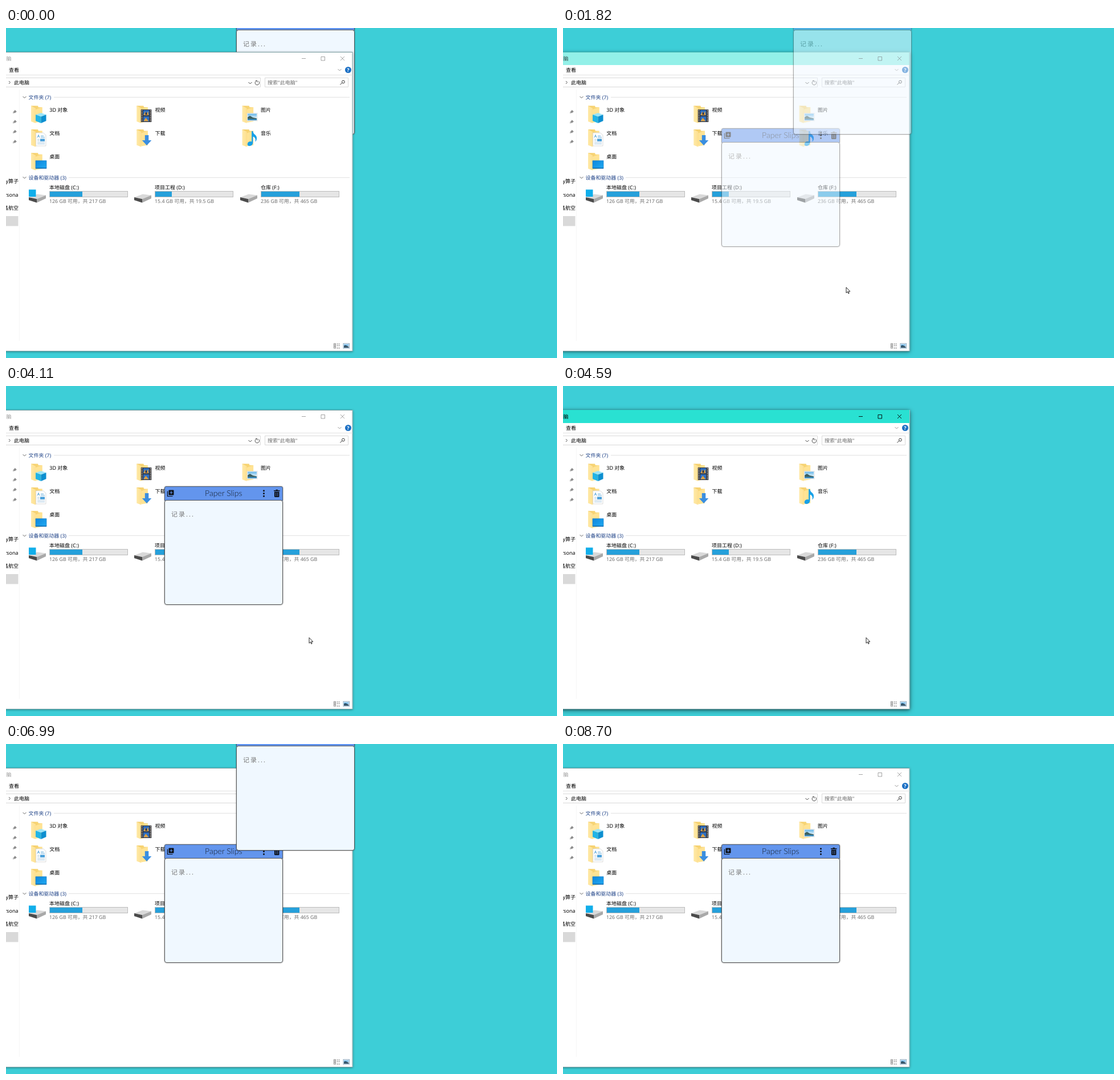
An HTML page that plays this animation: 967x579 px, repeating every 9.16 s.

```html
<!DOCTYPE html>
<html lang="zh">
<head>
<meta charset="utf-8">
<title>桌面便签</title>
<style>
  html, body { margin: 0; width: 100%; height: 100%; overflow: hidden; background: #3dced7; }
  svg { display: block; width: 100%; height: 100%; }
  text { font: 9px "Noto Sans", "Noto Sans CJK SC", "Noto Sans CJK", sans-serif; text-rendering: geometricPrecision; white-space: pre; }
  .sub { fill: #6d6d6d; font-size: 8.85px; }
  .head { fill: #1e4287; font-size: 8.95px; }
  .line { fill: none; stroke: #e2e2e2; }
  .title { font: 300 14px Lato, sans-serif; fill: #16202e; text-anchor: middle; }
  .hint { font-size: 11px; letter-spacing: 2px; fill: #757575; }
</style>
</head>
<body>
<svg viewBox="0 0 967 579" preserveAspectRatio="none">
  <defs>
    <filter id="soft" x="-10%" y="-10%" width="120%" height="120%">
      <feDropShadow dx="0" dy="1" stdDeviation="2" flood-opacity=".4"/>
    </filter>
    <filter id="deep" x="-10%" y="-10%" width="120%" height="120%">
      <feDropShadow dx="0" dy="2" stdDeviation="5" flood-opacity=".45"/>
    </filter>
    <filter id="noteShade" x="-5%" y="-5%" width="110%" height="110%">
      <feDropShadow dx="0" dy="0" stdDeviation="1" flood-opacity=".45"/>
    </filter>
    <linearGradient id="back"><stop stop-color="#f3cb63"/><stop offset="1" stop-color="#fbdc84"/></linearGradient>
    <linearGradient id="flap"><stop stop-color="#ffe9a6"/><stop offset="1" stop-color="#fde092"/></linearGradient>
    <linearGradient id="sky" x2="0" y2="1"><stop stop-color="#5fb2e8"/><stop offset=".6" stop-color="#d7edf8"/></linearGradient>
    <linearGradient id="screen" x2="1" y2="1"><stop stop-color="#0f86dc"/><stop offset="1" stop-color="#20aaf2"/></linearGradient>

    <g id="folder">
      <path d="M1 1.5H13L14 4H20.500V29H6z" fill="url(#back)"/>
      <path d="M1 1.500L9 5.500V32L1 29z" fill="url(#flap)"/>
      <path d="M9 8L20.500 4V29L9 31z" fill="#ffe394"/>
    </g>
    <g id="drive">
      <path d="M0 6L15 0.500 30 2.500 14 9z" fill="#d9d9d9"/>
      <path d="M0 6L14 9V15.500L0 11z" fill="#4b4b4b"/>
      <path d="M14 9L30 2.500V8L14 15.500z" fill="#a9a9a9"/>
    </g>
    <g id="pin" fill="#8b8b8b" stroke="#8b8b8b">
      <path d="M0-3.500L3.500 0 2 .5 0 2.500-2.500 0-.5-2z" stroke="none"/>
      <path d="M-3.500 1.500L0-1.500M-3 3L-1 1" fill="none"/>
    </g>
    <path id="chev" d="M-3-1.500L0 1.500 3-1.500" fill="none"/>

    <g id="note">
      <g filter="url(#noteShade)">
        <path d="M278.500 201V179Q278.500 176.500 281 176.500H483Q485.500 176.500 485.500 179V201z" fill="#6495ed" stroke="#4c5a70"/>
        <rect x="278.500" y="200.500" width="207" height="183" rx="3.500" fill="#f0f8ff" stroke="#555"/>
      </g>
      <text class="title" x="381.700" y="193">Paper Slips</text>
      <text class="hint" x="290" y="229">记录...</text>
      <g fill="#0d1117">
        <rect x="285.500" y="182.500" width="9" height="9" rx="1"/>
        <path d="M283.500 184.500V193.500H292.500" fill="none" stroke="#0d1117" stroke-width="1.200"/>
        <path d="M290 184.500V189.500M287.500 187H292.500" stroke="#6495ed" stroke-width="1.200"/>
        <circle cx="452.500" cy="183.700" r="1.500"/><circle cx="452.500" cy="188.500" r="1.500"/><circle cx="452.500" cy="193.200" r="1.500"/>
        <path d="M470 183h3l1-1.200h2.500l1 1.200h3v1.500h-10.500z"/>
        <path d="M471 185.500h8.500v8q0 1.500-1.500 1.500h-5.500q-1.500 0-1.500-1.500z"/>
        <path d="M473.700 187v6.500M476.800 187v6.500" stroke="#6495ed" stroke-width=".8"/>
      </g>
    </g>
  </defs>

  <rect width="967" height="579" fill="#3dced7"/>
  <use id="behind" href="#note" x="126" y="-197"/>

  <g id="explorer">
    <rect x="-20" y="42" width="628.500" height="525" fill="#fff" filter="url(#soft)"/>
    <rect id="glow" x="-20" y="42" width="628.500" height="525" fill="#fff" filter="url(#deep)"/>
    <rect x="-20" y="42.500" width="628" height="524.500" fill="#fff" stroke="#4f7f84" stroke-opacity=".75"/>
    <rect id="bar" x="-20" y="42" width="628" height="23" fill="#29e1d2"/>
    <g id="caption">
      <text x="9.500" y="57" text-anchor="end">此电脑</text>
      <path d="M519 53.500H526M553 50.500H559.500V57H553zM587 50L594 57M594 50L587 57" fill="none" stroke="#000" stroke-width=".9"/>
    </g>

    <text x="5" y="77">查看</text>
    <use href="#chev" x="585.500" y="73.500" stroke="#999"/>
    <circle cx="600.500" cy="73.500" r="5.500" fill="#1a6fc4"/>
    <text x="600.500" y="76.800" text-anchor="middle" style="fill:#fff;font-weight:700">?</text>
    <path class="line" d="M0 82.500H608"/>
    <path class="line" d="M-5 87.500H446.500V103.500H-5zM454.500 87.500H600.500V103.500H454.500z" style="stroke:#d9d9d9"/>
    <path d="M5 93L7.500 95.500 5 98" fill="none" stroke="#555"/>
    <text x="14" y="98.700">此电脑</text>
    <use href="#chev" x="428.500" y="96.500" stroke="#444"/>
    <path d="M438.700 93.200A3.700 3.700 0 1 0 443 93.200M438 92.500h2.800v2.800" fill="none" stroke="#444"/>
    <text x="459" y="99" fill="#6d6d6d">搜索"此电脑"</text>
    <path d="M589.800 96.200L586.500 99.500M589.500 94.500a2.400 2.400 0 1 0 4.800 0a2.400 2.400 0 1 0-4.800 0" fill="none" stroke="#333"/>

    <path class="line" d="M23.500 108V549" style="stroke:#f6f6f6"/>
    <g id="side" text-anchor="end">
      <rect y="330" width="21.500" height="17.500" fill="#d9d9d9"/>
      <text x="22" y="272">ny算子</text>
      <text x="21.500" y="296">rsona</text>
      <text x="22" y="319">昌航空</text>
    </g>

    <use href="#chev" x="32.500" y="121.500" stroke="#666"/>
    <text class="head" x="39.500" y="124.500">文件夹 (7)</text>
    <path class="line" d="M84 121.500H603"/>
    <use href="#chev" x="32.500" y="262.500" stroke="#666"/>
    <text class="head" x="39.500" y="265.500">设备和驱动器 (3)</text>
    <path class="line" d="M110 262.500H603"/>
    <g id="items"></g>

    <g fill="none" stroke="#777">
      <path d="M575.500 553.500h3v2.500h-3zM575.500 559.500h3v2.500h-3zM575.500 556.500h3v2.500h-3z" stroke-width=".8"/>
      <path d="M580.500 554.500h5.500M580.500 557.500h5.500M580.500 561.500h5.500" stroke-dasharray="2.500 .7"/>
      <rect x="592" y="553.500" width="10.500" height="8.500" fill="#fff" stroke="#8aa9c2"/>
      <path d="M593 555h8.500v2.500h-8.500z" fill="#6db5e6" stroke="none"/>
      <path d="M593 557.500l3-1 5.500 2.500v2h-8.500z" fill="#35566b" stroke="none"/>
    </g>
  </g>

  <use id="lower" href="#note"/>
  <use id="upper" href="#note" x="126" y="-197"/>

  <g id="cursor" stroke="#111">
    <path id="arrow" d="M0 0V9.800L2.300 7.700 3.800 11 5.200 10.400 3.800 7.200H6.800z" fill="#fff" stroke-width=".9"/>
    <path id="resize" d="M0-6.500L3.200-3H1V3H3.200L0 6.500-3.200 3H-1V-3H-3.200z" fill="#fff" stroke-width=".9"/>
  </g>
</svg>
<script>
const $ = id => document.getElementById(id);
const LOOP = 9160;

// Overlay drawings, in the coordinates of their folder
const badges = {
  cube: `<path d="M18.500 14L27.500 17 18.500 20.500 9 17z" fill="#9be4f8"/>
    <path d="M9 17L18.500 20.500V32L9 28z" fill="#22b4e6"/><path d="M18.500 20.500L27.500 17V28L18.500 32z" fill="#0c8fd0"/>`,
  film: `<rect x="8.500" y="8" width="18.500" height="22" fill="#2c2c30"/>
    <path d="M10.300 9V30M25.200 9V30" stroke="#e8e8e8" stroke-width="1.500" stroke-dasharray="1.500 1.500"/>
    <path d="M12.500 9h10.500v9.500h-10.500zM12.500 20h10.500v9h-10.500z" fill="#2f6fc0"/>
    <path d="M13 18l3-6 3 3 2-4 1 7zM13 28.500l4-6 5 6z" fill="#e3a13c"/><path d="M17 12l3 5h-4z" fill="#182a50"/>`,
  photo: `<rect x="9.500" y="14.500" width="18" height="13.500" fill="#fff" stroke="#d5d5d5" stroke-width=".7"/>
    <rect x="10.500" y="15.500" width="16" height="11.500" fill="url(#sky)"/>
    <path d="M10.500 21.500l4-2.500 5 3 7 1.500v1.500h-16z" fill="#3c5f5e"/><path d="M10.500 24.500h16v2.500h-16z" fill="#3f8fc0"/>`,
  paper: `<path d="M9.500 7.500H22.500L27 11.500V30.500H9.500z" fill="#fdfdfd" stroke="#cfcfcf" stroke-width=".7"/>
    <path d="M12 16l2-5 2 5M12.800 14h2.500M18 13h5M18 15.500h7" fill="none" stroke="#5aa7dc" stroke-width=".9"/>
    <path d="M17 18h8v4.500h-8z" fill="#4aa0da"/><path d="M12 19h4M12 21.500h4M12 24.500h13M12 27h13" stroke="#a9cbe2" stroke-width=".9"/>`,
  down: `<path d="M15.500 11.500h6.500v9h5L18.700 29.500 10.500 20.500h5z" fill="#3a8ee0"/>`,
  music: `<path d="M17.500 4.500h2.300q.5 4 4 6.500 3.500 3 2.500 8-.7 3-2.500 4 1.300-5-1.300-7.500-1.500-1.500-2.700-1.500v10.500q0 5-5.500 6.200-4 .3-4.200-3 .2-4.500 5-5 1.500-.2 2.400.5z" fill="#17a1e8"/>`,
  desk: `<rect x="9" y="15" width="19" height="13.500" fill="url(#screen)" stroke="#0b74c4" stroke-width=".6"/>
    <path d="M9 27.500h19v1h-19z" fill="#0a5fa5"/>`
};
const folders = [["3D 对象", "cube"], ["视频", "film"], ["图片", "photo"], ["文档", "paper"],
  ["下载", "down"], ["音乐", "music"], ["桌面", "desk"]];
const drives = [["本地磁盘 (C:)", "126 GB 可用，共 217 GB", 57], ["项目工程 (D:)", "15.4 GB 可用，共 19.5 GB", 29],
  ["仓库 (F:)", "236 GB 可用，共 465 GB", 67]];
const colX = i => 185.3 * i;

function folderMarkup([name, badge], i) {
  const x = colX(i % 3), y = 135 + 41.4 * Math.floor(i / 3);
  return `<g transform="translate(${43 + x} ${y})"><use href="#folder"/>${badges[badge]}
    <text x="33.300" y="11.700">${name}</text></g>`;
}

function driveMarkup([name, size, used], i) {
  return `<g transform="translate(${Math.round(colX(i))} 0)"><use href="#drive" x="40" y="291"/>
    ${i ? "" : '<rect x="40" y="283.500" width="12.500" height="12.500" fill="#11aeea"/>'}
    <text x="76" y="283">${name}</text><text class="sub" x="76" y="306.700">${size}</text>
    <rect x="76.500" y="286.500" width="137" height="10" fill="#e6e6e6" stroke="#bcbcbc"/>
    <rect x="77" y="287" width="${used}" height="9" fill="#26a0da"/></g>`;
}

$("items").innerHTML = folders.map(folderMarkup).join("") + drives.map(driveMarkup).join("");
$("side").insertAdjacentHTML("beforeend",
  [147, 164.5, 182, 199.5].map(y => `<use href="#pin" x="15.500" y="${y}"/>`).join(""));

// Progress in n equal jumps, the first at a and the last at b
function jumps(t, a, b, n) {
  if (t < a) return 0;
  if (t >= b) return 1;
  return (1 + Math.floor((t - a) / (b - a) * (n - 1))) / n;
}

// Pointer moves: begin, end, jumps, x, y
const moves = [
  [110, 480, 6, 497, 455], [2270, 2500, 4, 504, 451], [2650, 2730, 2, 504, 447.5],
  [2880, 3050, 4, 538, 448], [3120, 3190, 2, 532, 448.5], [3330, 3500, 3, 532, 441.5],
  [5440, 5590, 3, 476, 171], [5820, 6210, 6, 427.5, 47], [6310, 6390, 2, 430, 3],
  [6460, 6680, 4, 847, 569], [6760, 6990, 4, 912, 580]
];

function pointer(t) {
  let x = 945, y = 595;
  for (const [a, b, n, tx, ty] of moves) {
    const k = jumps(t, a, b, n);
    x += (tx - x) * k;
    y += (ty - y) * k;
  }
  return [x, y];
}

const fade = (id, v) => $(id).setAttribute("opacity", v);

function draw(t) {
  const show1 = jumps(t, 1820, 1880, 2), show2 = jumps(t, 6390, 6460, 2);
  const active = jumps(t, 630, 720, 2) - show1 + jumps(t, 4510, 4590, 2) - show2;
  fade("bar", active);
  fade("glow", active);
  fade("caption", 0.4 + 0.6 * active);
  fade("behind", 1 - jumps(t, 110, 270, 3));
  fade("lower", t < 4510 ? show1 : show2);
  fade("upper", show1 - jumps(t, 3960, 4110, 3) + show2 - jumps(t, 8460, 8700, 4));

  const [x, y] = pointer(t);
  const sizing = t >= 6210 && t < 6310;
  $("cursor").setAttribute("transform", `translate(${x} ${y})`);
  fade("arrow", sizing ? 0 : 1);
  fade("resize", sizing ? 1 : 0);
}

function tick() {
  draw(performance.now() % LOOP);
  requestAnimationFrame(tick);
}
tick();
</script>
</body>
</html>
```
